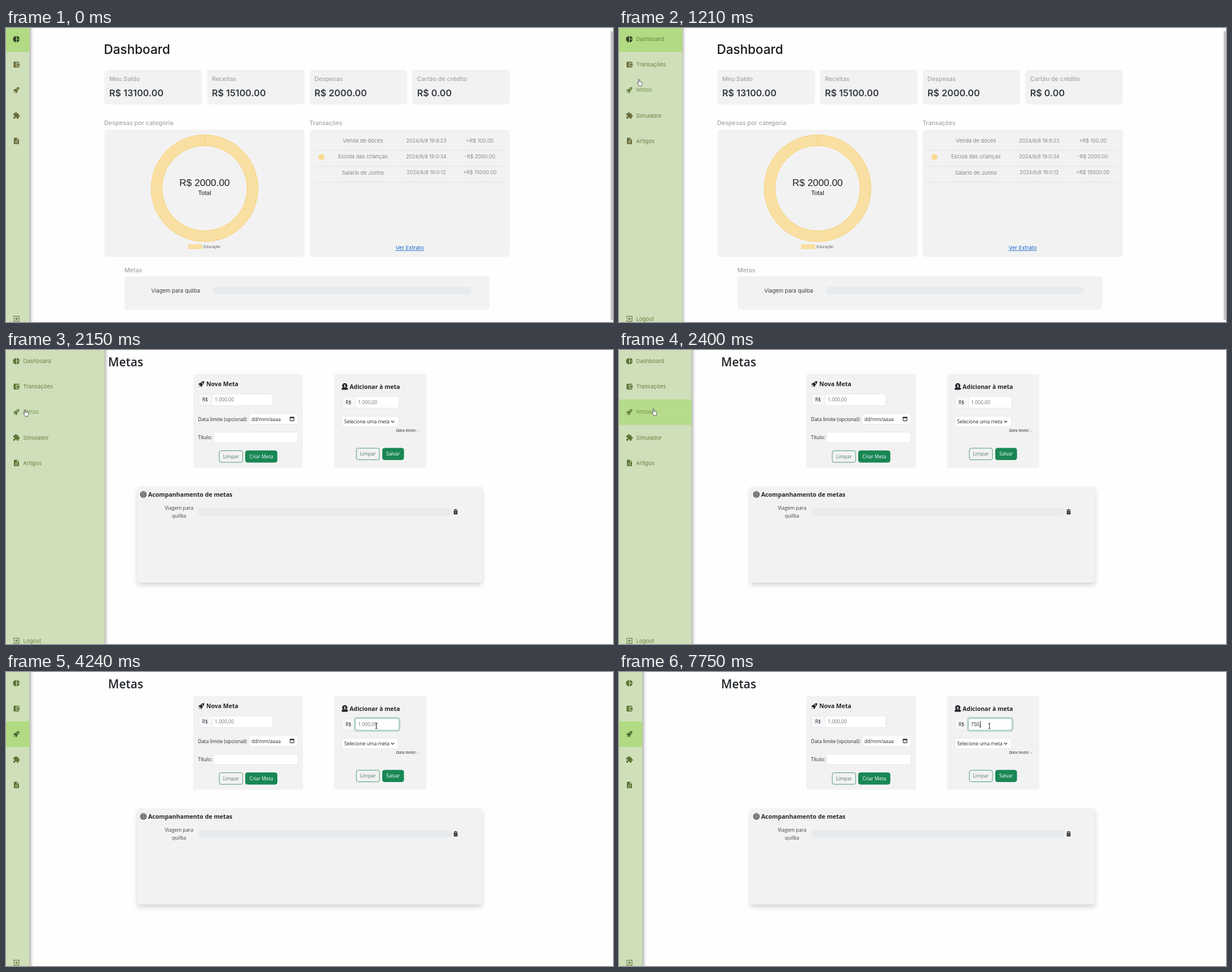
These frames come from a looping animation (1076x521 px, 8000 ms). An HTML page with a canvas:

```html
<!DOCTYPE html>
<html lang="pt-BR">
<head>
<meta charset="utf-8">
<title>Metas</title>
<style>
html, body { margin: 0; width: 100%; height: 100%; overflow: hidden; background: #fff; }
canvas { display: block; }
</style>
</head>
<body>
<canvas id="stage" width="1076" height="521"></canvas>
<script>
const ctx = document.getElementById('stage').getContext('2d');
const LOOP = 8000;
const INTER = 'Inter, sans-serif';
const OPEN = '"Open Sans", sans-serif';
const ARIAL = '"Liberation Sans", Arial, sans-serif';
const INK = '#212529', GREEN = '#198754', CARD = '#f2f2f2', TRACK = '#e8ebee', HINT = '#6f757a';
const GOAL = 'quilba';
const OPEN_AT = 810, PRESS_AT = 1810, PAGE_AT = 2080, CLOSE_AT = 2470, SLIDE = 600;
const NARROW = 41.6, WIDE = 118, MOUNTED = 183;

const icons = {
  pie: 'M11 2a10 10 0 0 0 0 20zM13 2v9h9a10 10 0 0 0-9-9zM13 13v9a10 10 0 0 0 9-9z',
  wallet: 'M21 6V5a2 2 0 0 0-2-2H5a2 2 0 0 0-2 2v14a2 2 0 0 0 2 2h14a2 2 0 0 0 2-2v-1h-9a2 2 0 0 1-2-2V8a2 2 0 0 1 2-2zM12 8h10v8H12zm4 2.500a1.500 1.500 0 1 0 0 3a1.500 1.500 0 1 0 0-3z',
  rocket: 'M21 3q-7-1-12 6L4 10l-2 4 4 1 3 3 1 4 4-2 1-5q7-5 6-12zM15 7a2 2 0 1 0 0 4a2 2 0 1 0 0-4zM3 21l1-4 3 3z',
  puzzle: 'M4 5h4V3.500a2.500 2.500 0 0 1 5 0V5h4a2 2 0 0 1 2 2v4h1.500a2.500 2.500 0 0 1 0 5H19v4a2 2 0 0 1-2 2h-3.800v-1.500a2.700 2.700 0 0 0-5.400 0V22H4a2 2 0 0 1-2-2v-3.800h1.500a2.700 2.700 0 0 0 0-5.400H2V7a2 2 0 0 1 2-2z',
  page: 'M6 2h8l6 6v14H4V4a2 2 0 0 1 2-2zM13 3.500V9h5.500zM8 12h8v2H8zM8 16h8v2H8z',
  exit: 'M3 9V3h18v18H3v-6h2v4h14V5H5v4zM3 11h9.700l-2.600-2.600L11.500 7l5 5-5 5-1.400-1.400 2.600-2.600H3z',
  trash: 'M4 4h5V2h6v2h5v2H4zM5 8h14v14H5zM9 10v9h1.500v-9zM13.500 10v9H15v-9z'
};
const pointers = {
  arrow: { path: 'M0 0v17l4-4 2.500 6 2.500-1-2.500-6H12z', tip: 0 },
  hand: { path: 'M5 1.500a1.500 1.500 0 0 1 3 0V8l7 1.500q2 .5 2 3l-1 5-1 4.500H7l-1-3-5-6q0-2 2-2l2 2z', tip: 6 }
};
for (const name in icons) icons[name] = new Path2D(icons[name]);
for (const p of Object.values(pointers)) p.path = new Path2D(p.path);

const clamp = v => Math.min(1, Math.max(0, v));
const lerp = (a, b, k) => a + (b - a) * k;
const smooth = k => k * k * (3 - 2 * k);

// CSS "ease": cubic-bezier(.25, .1, .25, 1)
function ease(x) {
  x = clamp(x);
  let lo = 0, hi = 1;
  for (let i = 0; i < 20; i++) {
    const s = (lo + hi) / 2, r = 1 - s;
    if (.75 * s * r * r + .75 * s * s * r + s ** 3 < x) lo = s; else hi = s;
  }
  const r = 1 - lo;
  return .3 * lo * r * r + 3 * lo * lo * r + lo ** 3;
}

// y is the middle of the capitals
function text(str, x, y, size, color, { font = INTER, weight = 400, align = 'left', style = '' } = {}) {
  ctx.font = `${style} ${weight} ${size}px ${font}`;
  ctx.textAlign = align;
  ctx.fillStyle = color;
  ctx.fillText(str, x, y + size * .36);
}

function box(x, y, w, h, r, fill, stroke, line = 1) {
  ctx.beginPath();
  ctx.roundRect(x, y, w, h, r);
  if (fill) { ctx.fillStyle = fill; ctx.fill(); }
  if (stroke) { ctx.strokeStyle = stroke; ctx.lineWidth = line; ctx.stroke(); }
}

function circle(x, y, r, fill, stroke, line = 1) {
  ctx.beginPath();
  ctx.arc(x, y, r, 0, 2 * Math.PI);
  if (fill) { ctx.fillStyle = fill; ctx.fill(); }
  if (stroke) { ctx.strokeStyle = stroke; ctx.lineWidth = line; ctx.stroke(); }
}

function line(color, width, ...pts) {
  ctx.beginPath();
  pts.forEach(([x, y]) => ctx.lineTo(x, y));
  ctx.strokeStyle = color;
  ctx.lineWidth = width;
  ctx.stroke();
}

function icon(name, cx, cy, size, color) {
  ctx.save();
  ctx.translate(cx - size / 2, cy - size / 2);
  ctx.scale(size / 24, size / 24);
  ctx.fillStyle = color;
  ctx.fill(icons[name], 'evenodd');
  ctx.restore();
}

function shadow(color, blur, dx, dy, draw) {
  ctx.save();
  ctx.shadowColor = color;
  ctx.shadowBlur = blur;
  ctx.shadowOffsetX = dx;
  ctx.shadowOffsetY = dy;
  draw();
  ctx.restore();
}

function doughnut() {
  const cx = 352, cy = 284;
  circle(cx, cy, 85, null, '#f9dfa2', 20);
  circle(cx, cy, 94.5, null, '#f8d37e');
  circle(cx, cy, 75.5, null, '#f8d37e');
  line('#f8cf70', 1.3, [cx, cy - 95], [cx, cy - 75]);
  text('R$ 2000.00', cx, 274, 17.3, '#222', { font: ARIAL, align: 'center' });
  text('Total', cx, 292.3, 11, '#222', { font: ARIAL, align: 'center' });
  box(323.5, 384, 23.5, 7, 0, '#f9dfa2', '#f8d37e');
  text('Educação', 350, 387.2, 6.75, '#666', { font: ARIAL });
}

function dashboard() {
  const muted = { weight: 500 }, gray = '#a3a5a7';
  text('Dashboard', 173.5, 38, 22.5, '#16191c', muted);
  [['Meu Saldo', '13100.00'], ['Receitas', '15100.00'], ['Despesas', '2000.00'], ['Cartão de crédito', '0.00']]
    .forEach(([label, value], i) => {
      const x = 174.5 + 181.9 * i;
      box(x, 74, 173, 61.5, 5.5, CARD);
      text(label, x + 8.5, 90.2, 10.7, gray, muted);
      text('R$ ' + value, x + 8.5, 115, 16.2, '#343a40', { weight: 600 });
    });
  text('Despesas por categoria', 174, 168.3, 10.8, gray, muted);
  text('Transações', 538, 168.3, 10.5, gray, muted);
  box(174.5, 180, 355, 225.5, 5.5, CARD);
  box(538.3, 180, 355, 225.5, 5.5, CARD);
  doughnut();

  [['Venda de doces', '19:9:23', '+R$ 100.00'], ['Escola das crianças', '19:0:34', '-R$ 2000.00'],
   ['Salario de Junho', '19:0:12', '+R$ 15000.00']].forEach(([name, time, amount], i) => {
    const y = 199.8 + 28.2 * i, mid = { align: 'center' };
    text(name, 632.7, y, 9.4, '#85888a', mid);
    text('2024/6/8 ' + time, 745, y, 8.7, '#85888a', mid);
    text(amount, 840, y, 9, '#85888a', mid);
    line('#e0e3e5', 1, [547, y + 17], [884, y + 17]);
  });
  circle(559, 228.8, 5.3, '#f9d98f');
  text('Ver Extrato', 715.5, 389.6, 9.5, '#1767cf', { align: 'center' });
  line('#1767cf', .8, [690, 394.5], [741, 394.5]);

  text('Metas', 210, 429.3, 10.7, gray, muted);
  box(210, 440, 647, 59.5, 5.5, CARD);
  text('Viagem para ' + GOAL, 257.5, 465.3, 9.5, '#3a3d40');
  box(367, 458, 458, 14, 7, TRACK);

  box(1071, 0, 5, 521, 0, '#f3f3f3');
  box(1072, 6, 4, 511, 0, '#c2c2c2');
}

function button(label, x, y, w, solid) {
  box(x + .5, y + .5, w - 1, 20.5, 3.4, solid && GREEN, solid ? GREEN : '#4f9c78');
  text(label, x + w / 2, y + 10.9, 8.6, solid ? '#fff' : '#587a68', { font: OPEN, align: 'center' });
}

function field(x, y, w, h, fill = '#fff') {
  box(x + .5, y + .5, w - 1, h - 1, 3, fill, '#e6e9ec');
}

function moneyField(x, y, w, split, value, color) {
  field(x, y, w, 21.5, '#f6f7f8');
  field(split, y, x + w - split, 21.5);
  text('R$', (x + split) / 2, y + 10.8, 8.5, INK, { font: OPEN, align: 'center' });
  text(value, split + 5, y + 10.8, 8.6, color, { font: OPEN });
}

function typedAt(t) {
  return '750,'.slice(0, [5890, 6230, 6690, 7750].filter(at => t >= at).length);
}

function caretOn(t) {
  if (t < 5890) return t >= 3700 && Math.floor((t - 3710) / 530) % 2 === 0;
  return t < 7220 || t >= 7750;
}

function amountField(t) {
  const typed = typedAt(t), focus = clamp((t - 3700) / 180);
  moneyField(595, 82, 102, 619, typed || '1.000,00', typed ? INK : HINT);
  if (focus) {
    ctx.globalAlpha = focus;
    box(617.9, 80.9, 80.2, 23.7, 4, null, '#b7d5c7', 2.2);
    box(619.5, 82.5, 77, 20.5, 3, null, '#a5cbb9', 1);
    ctx.globalAlpha = 1;
  }
  if (caretOn(t)) {
    ctx.font = `400 8.6px ${OPEN}`;
    const x = Math.floor(624 + ctx.measureText(typed).width);
    box(x, 87, 1, 12, 0, INK);
  }
}

function goals(t) {
  const f = { font: OPEN }, head = { font: OPEN, weight: 700 };
  text('Metas', 181, 21.2, 21, INK, { font: OPEN, weight: 600 });

  box(332, 42.5, 194.5, 166, 3.5, CARD);
  icon('rocket', 346.5, 60.2, 13, INK);
  text('Nova Meta', 355, 60.5, 10.5, INK, head);
  moneyField(340.5, 77.5, 133, 365, '1.000,00', HINT);
  text('Data limite (opcional):', 340.5, 122.5, 8.65, INK, f);
  field(430.5, 112.5, 87.5, 19.5);
  text('dd/mm/aaaa', 435, 122.5, 8.6, INK, f);
  box(503.7, 119.5, 6.8, 6, .5, null, '#111');
  box(503.2, 118.5, 7.8, 2.2, 0, '#111');
  text('Título:', 340.5, 155.3, 8.65, INK, f);
  field(367.5, 145, 150.5, 19.5);
  button('Limpar', 377.5, 178, 42.5, false);
  button('Criar Meta', 424, 178, 57, true);

  box(581.5, 42.5, 163.5, 166, 3.5, CARD);
  circle(600.5, 63.3, 4.6, INK);
  text('$', 600.5, 63.2, 6.5, '#fff', { font: OPEN, weight: 700, align: 'center' });
  box(595, 67, 11, 3.4, 1, INK);
  text('Adicionar à meta', 609, 65.2, 10.5, INK, head);
  amountField(t);
  field(595, 117, 101.5, 19.5);
  text('Selecione uma meta', 599.5, 126.8, 8.5, INK, f);
  line('#343a40', 1.1, [682.5, 125.5], [685.2, 128.2], [688, 125.5]);
  text('Data limite: -', 731.5, 142, 7.1, INK, { font: OPEN, align: 'right', style: 'italic' });
  button('Limpar', 620.5, 173.5, 42, false);
  button('Salvar', 667, 173.5, 38.5, true);

  shadow('rgba(0,0,0,.17)', 9, 0, 4.5, () => box(233, 242, 611, 170, 3.5, CARD));
  circle(243.5, 255.9, 5, null, INK, 1.3);
  circle(243.5, 255.9, 2.6, null, INK, 1.2);
  circle(243.5, 255.9, 1, INK);
  text('Acompanhamento de metas', 252, 256.2, 10.6, INK, head);
  text('Viagem para', 306.7, 280.2, 8.7, '#3a3e42', { font: OPEN, align: 'center' });
  text(GOAL, 306.7, 293.8, 8.7, '#3a3e42', { font: OPEN, align: 'center' });
  box(340, 280, 451, 13.5, 6.75, TRACK);
  icon('trash', 797, 286.6, 11, '#17191c');
}

function menuWidth(t) {
  if (t < PAGE_AT) return lerp(NARROW, WIDE, ease((t - OPEN_AT) / SLIDE));
  const settling = at => lerp(MOUNTED, WIDE, ease((at - PAGE_AT) / SLIDE));
  if (t < CLOSE_AT) return settling(t);
  return lerp(settling(CLOSE_AT), NARROW, ease((t - CLOSE_AT) / SLIDE));
}

const menu = [['pie', 'Dashboard'], ['wallet', 'Transações'], ['rocket', 'Metas'],
  ['puzzle', 'Simulador'], ['page', 'Artigos'], ['exit', 'Logout']];

function sidebar(t, pointer) {
  const w = menuWidth(t), onGoals = t >= PAGE_AT, active = onGoals ? 2 : 0;
  const labels = t >= OPEN_AT && t < CLOSE_AT;
  shadow('rgba(0,0,0,.45)', 6, 1, 0, () => box(-10, -10, w + 10, 541, 0, '#cfdfba'));
  ctx.save();
  ctx.beginPath();
  ctx.rect(0, 0, w, 521);
  ctx.clip();

  ctx.globalAlpha = onGoals ? clamp((t - 2150) / 300) : 1;
  box(0, onGoals ? 87.5 : -3, w, 45.3, 0, '#b1da82');
  ctx.globalAlpha = onGoals ? 0 : clamp((t - PRESS_AT) / 150);
  box(0, 87.5, w, 45.3, 0, '#a2b489');
  ctx.globalAlpha = 1;

  menu.forEach(([name, label], i) => {
    const y = i === 5 ? 515.3 : 19.8 + 45.1 * i;
    const hover = labels && pointer && pointer.x < w && Math.abs(pointer.y + 2 - y) < 22;
    let color = onGoals ? '#5b7434' : '#6b6b38';
    if (i === active) color = onGoals ? '#4a6430' : '#374329';
    if (hover) color = '#688443';
    icon(name, 18.5, y, 13.5, color);
    if (labels) text(label, 30.5, y, 9.6, hover ? '#7b9753' : '#6c8141');
  });
  ctx.restore();
}

const route = [[120, 1020, 280], [870, 38, 44], [940, 38, 44], [1340, 32.5, 105.5], [2350, 32.5, 105.5],
  [2740, 616.5, 70], [3010, 656, 103], [3195, 656, 103], [3300, 656, 96], [4100, 656, 96], [4120, 656, 95.5]];

function pointerAt(t) {
  if (t < route[0][0]) return null;
  const next = route.findIndex(([at]) => at > t);
  if (next < 0) return { x: 656, y: 95.5 };
  const [t0, x0, y0] = route[next - 1], [t1, x1, y1] = route[next];
  const k = smooth((t - t0) / (t1 - t0));
  return { x: lerp(x0, x1, k), y: lerp(y0, y1, k) };
}

function drawPointer(t, p) {
  if (!p) return;
  if (t >= 2700) {
    const x = Math.floor(p.x) + .5, y = p.y, color = t < 2800 ? '#8a8a8a' : '#333';
    line(color, 1, [x, y - 4.5], [x, y + 4.5]);
    for (const end of [-4.5, 4.5]) line(color, 1, [x - 2, y + end], [x + 2, y + end]);
    return;
  }
  const loading = t >= 1940 && t < PAGE_AT;
  const { path, tip } = pointers[p.x < menuWidth(t) && !loading ? 'hand' : 'arrow'];
  ctx.save();
  ctx.translate(p.x, p.y);
  ctx.scale(.56, .56);
  ctx.translate(-tip + 2, 0);
  ctx.fillStyle = '#fff';
  ctx.fill(path);
  ctx.strokeStyle = '#333';
  ctx.lineWidth = 1.4;
  ctx.stroke(path);
  ctx.restore();
}

function render(t) {
  const pointer = pointerAt(t);
  ctx.fillStyle = '#fefefe';
  ctx.fillRect(0, 0, 1076, 521);
  if (t < PAGE_AT) dashboard(); else goals(t);
  sidebar(t, pointer);
  drawPointer(t, pointer);
}

const start = performance.now();
function tick() {
  render((performance.now() - start) % LOOP);
  requestAnimationFrame(tick);
}
tick();
</script>
</body>
</html>
```
